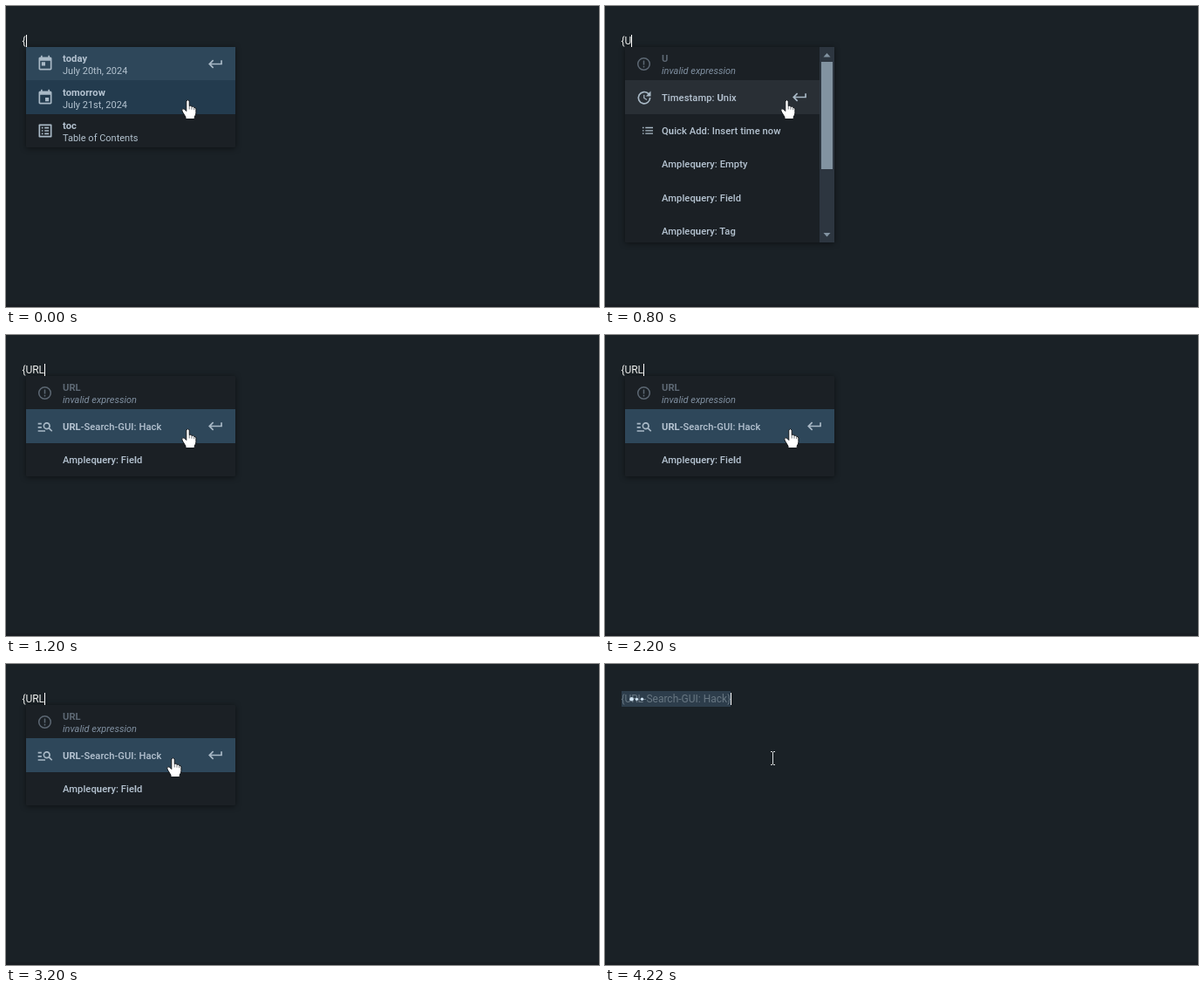
These frames come from a looping animation (680x345 px, 4420 ms). An HTML page:

```html
<!DOCTYPE html>
<html lang="en">
<head>
<meta charset="utf-8">
<title>Command menu</title>
<style>
html, body { margin: 0; width: 100%; height: 100%; overflow: hidden; background: #1a2126; }
svg { display: block; width: 680px; height: 345px; font-family: Roboto, Arial, sans-serif; }
.panel { fill: #1b2025; filter: drop-shadow(0 1px 3px rgba(0, 0, 0, .5)); }
.title { font-size: 11.2px; font-weight: 500; letter-spacing: .06px; fill: #b5c3d1; }
.bold { font-weight: 700; }
.desc { font-size: 11px; fill: #b3c2cf; }
.dim { fill: #5d6874; }
.note { font-style: italic; fill: #8090a1; }
.icon { fill: #a9b9c6; }
.input { font-size: 12px; fill: #f0f1ee; }
.busy { fill: #687782; }
</style>
</head>
<body>
<svg id="stage" viewBox="0 0 680 345" xmlns="http://www.w3.org/2000/svg"></svg>
<script>
const LOOP = 4420;
const frame = "M19 3h-1V1h-2v2H8V1H6v2H5C3.9 3 3 3.9 3 5v14c0 1.1.9 2 2 2h14c1.1 0 2-.9 2-2V5c0-1.1-.9-2-2-2zm0 16H5V8h14z";
const icons = {
  today: frame + "M7 10h5v5H7z",
  event: frame + "M12 12h5v5h-5z",
  toc: "M4 3h16q1 0 1 1v16q0 1-1 1H4q-1 0-1-1V4q0-1 1-1zM5 5v14h14V5z" +
    [7, 11, 15].map(y => `M7 ${y}h2v2H7zM11 ${y}h6v2h-6z`).join(""),
  clock: "M21 10.1h-6.8L17 7.3A7 7 0 1 0 19 12.1h2A9 9 0 1 1 18.3 5.8L21 3zM12.5 8v4.2l3.5 2.1-.7 1.2L11 13V8z",
  search: "M2 7h5v2H2zM2 12h5v2H2zM2 17h10v2H2zM20.6 19l-3.8-3.8A5 5 0 1 1 18.2 13.8L22 17.6zM17 11a3 3 0 1 0-6 0 3 3 0 1 0 6 0z",
  list: [7, 11, 15].map(y => `M9.5 ${y}h2v1.6h-2zM13.5 ${y}h10.5v1.6H13.5z`).join(""),
  enter: "M19 7v4H5.8l3.6-3.6L8 6l-6 6 6 6 1.4-1.4L5.8 13H21V7z"
};
const tops = [47, 85, 124, 162, 200, 239, 271];
const mids = [66, 105, 143, 181, 220, 258];

const rect = (x, y, w, h, fill) => `<rect x="${x}" y="${y}" width="${w}" height="${h}" fill="${fill}"/>`;
const text = (x, y, cls, s) =>
  `<text x="${x}" y="${y}" class="${cls}">${s.replace(/\*(.+?)\*/g, '<tspan class="bold">$1</tspan>')}</text>`;
const icon = (name, x, y) =>
  `<path class="icon" fill-rule="evenodd" transform="translate(${x - 10} ${y - 10}) scale(.8333)" d="${icons[name]}"/>`;
const alertIcon = y => `<g fill="none" stroke="#5d6874" stroke-width="1.5">
  <circle cx="44.5" cy="${y}" r="6.8"/><path d="M44.5 ${y - 4}v5M44.5 ${y + 2.2}v1.8"/></g>`;

function row([name, title, desc], i) {
  const y = mids[i], bad = name === "alert";
  let s = bad ? alertIcon(y + .5) : name ? icon(name, 45, y) : "";
  if (!desc) return s + text(65, y + 4, "title", title);
  return s + text(65, y - 2, "title bold" + (bad ? " dim" : ""), title) +
    text(65, y + 12, "desc" + (bad ? " note" : ""), desc);
}

function scrollbar(end) {
  return rect(246, 47, 17, 224, "#2d3640") + rect(248, 64, 13, end - 64, "#8293a1") +
    `<path fill="#8293a1" d="M250.500 58.500l4-4.500 4 4.500zM250.500 260l4 4.500 4-4.500z"/>`;
}

// fills: [row, colour] pairs; mark: row holding the return sign; thumb: end of the scroll thumb
function menu(rows, fills, mark, thumb) {
  const right = thumb ? 246 : 263;
  return `<rect class="panel" x="23" y="47" width="240" height="${(thumb ? 271 : 162) - 47}" rx="1"/>` +
    fills.map(([i, c]) => rect(23, tops[i], right - 23, tops[i + 1] - tops[i], c)).join("") +
    rows.map(row).join("") + icon("enter", right - 22.6, mids[mark] + (mark ? -.5 : .5)) +
    (thumb ? scrollbar(thumb) : "");
}

const basics = [
  ["today", "today", "July 20th, 2024"],
  ["event", "tomorrow", "July 21st, 2024"],
  ["toc", "toc", "Table of Contents"]
];
const stamps = ["Digital", "Analog", "Text"].map(s => ["clock", `*Timestamp: ${s}*`]);
const invalid = s => ["alert", s, "invalid expression"];
const query = (word, kinds) => kinds.map(k => ["", `${word}: ${k}`]);
const kinds = ["Empty", "Field", "Tag"];
const blue = "#2e475a", pair = [[0, blue], [1, "#233b4e"]];

const scenes = {
  start: text(18.5, 44, "input", "{") + menu(basics, pair, 0),
  all: text(18.5, 44, "input", "{") + menu([...basics, ...stamps], pair, 0, 114),
  u: text(18.5, 44, "input", "{U") + menu([
    invalid("U"), ["clock", "Timestamp: *U*nix"], ["list", "Q*u*ick Add: Insert time now"],
    ...query("Ampleq*u*ery", kinds)], [[1, "#292f35"]], 1, 187),
  ur: text(18.5, 44, "input", "{UR") + menu([
    invalid("UR"), ["search", "*UR*L-Search-GUI: Hack"], ["list", "Q*u*ick Add: Inse*r*t time now"],
    ...query("Ampleq*u*e*r*y", kinds)], [[1, blue]], 1, 187),
  url: text(18.5, 44, "input", "{URL") + menu([
    invalid("URL"), ["search", "*URL*-Search-GUI: Hack"], ["", "Ampleq*u*e*r*y: Fie*l*d"]],
    [[1, blue]], 1),
  run: rect(19, 31, 125, 18, "#2d3d4b") + text(18.5, 44, "input busy", "{URL-Search-GUI: Hack}") +
    [[30.5, 2.3], [36.5, 1.6], [42.5, 1.7]].map(([x, r]) =>
      `<circle cx="${x}" cy="40.300" r="${r}" fill="#cfe3f2"/>`).join("") +
    `<path fill="none" stroke="#d8dcde" d="M190 100.500h2M193 100.500h2M192.500 101v14M190 115.500h2M193 115.500h2"/>`
};

// [time, scene, caret x or 0, hand x or 0]
const steps = [
  [0, "start", 23, 208.5],
  [200, "all", 23, 208.5],
  [600, "all", 0, 208.5],
  [800, "u", 30, 208.5],
  [1000, "ur", 38, 208.5],
  [1200, "url", 44, 208.5],
  [1600, "url", 0, 208.5],
  [2200, "url", 44, 212.5],
  [2600, "url", 44, 191.5],
  [2800, "url", 0, 191.5],
  [3200, "url", 44, 191.5],
  [3820, "url", 0, 191.5],
  [4220, "run", 144, 0]
];

const stage = document.getElementById("stage");
stage.innerHTML = rect(0, 0, 680, 345, "#1a2126") + rect(0, 342, 680, 3, "#181d22") +
  Object.entries(scenes).map(([k, s]) => `<g id="${k}">${s}</g>`).join("") +
  `<rect id="caret" y="33" width="1" height="14" fill="#fff"/>
  <g id="hand"><path fill="#fff" stroke="#15191d" stroke-linejoin="round" d="M-1.700 2Q0-.700 1.700 2V7.500Q3.500 6.500 4.500 8.300
    Q6.300 7.500 7.200 9.400Q9.300 9 9.400 11.200V15.500Q9.300 18 7.700 20V22.500H-2.500V20.300L-6.300 14Q-7.500 11.500-5.600 10.800
    Q-4 10.400-1.700 13.500Z"/><path fill="none" stroke="#30363c" stroke-width=".7" d="M1.700 7.500v4M4.500 8.500v3.200M7.200 9.600v2.600"/></g>`;

const get = id => document.getElementById(id);
const show = (el, on) => { el.style.display = on ? "" : "none"; };
const groups = Object.keys(scenes).map(get);
const caret = get("caret"), hand = get("hand");
const origin = performance.now();

function draw(now) {
  const t = Math.max(0, now - origin) % LOOP;
  const [, scene, cx, hx] = steps.findLast(s => s[0] <= t);
  groups.forEach(g => show(g, g.id === scene));
  show(caret, cx);
  show(hand, hx);
  caret.setAttribute("x", cx);
  hand.setAttribute("transform", `translate(${hx} 107)`);
  requestAnimationFrame(draw);
}
draw(origin);
</script>
</body>
</html>
```
